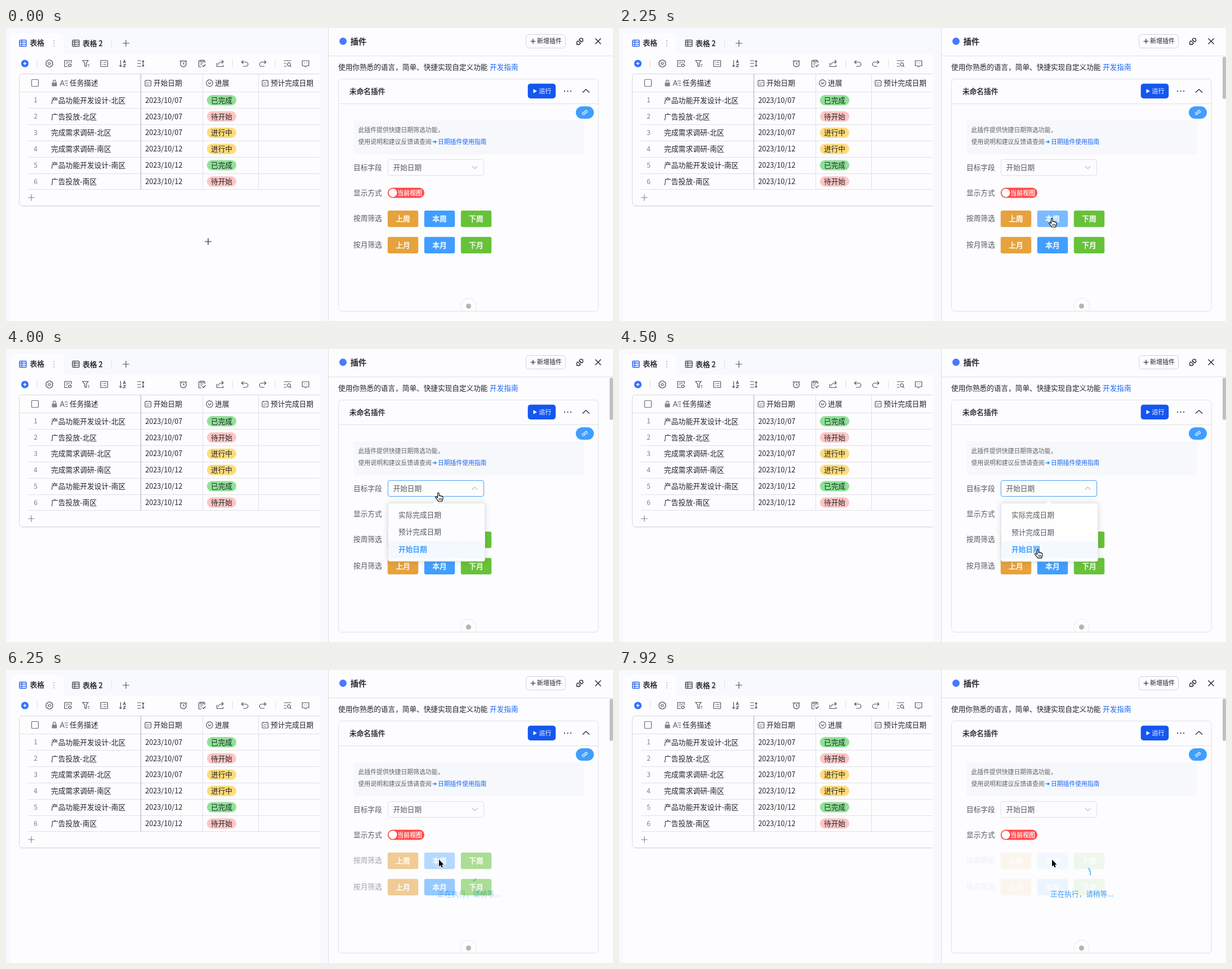
Write an HTML page that moves like this. It is 1078 px wide and 520 px high and loops after 8 s.

```html
<!DOCTYPE html>
<html lang="zh-CN">
<head>
<meta charset="utf-8">
<title>日期筛选</title>
<style>
html, body { margin: 0; width: 100%; height: 100%; overflow: hidden; background: #f8f9fe; }
svg { display: block; }
text { font-family: "Noto Sans CJK SC", "Noto Sans CJK", sans-serif; white-space: pre; }
</style>
</head>
<body>
<svg id="stage" width="1078" height="520" viewBox="0 0 1078 520"></svg>
<script>
const LOOP = 8000;
const STEP = 1000 / 12;
const INK = '#1f2329', GREY = '#51565d', FORM = '#55585e', LINE = '#dee0e3', PANEL = '#fdfdff';
const BLUE = '#409eff', LINK = '#1a66f5';

const rect = (x, y, w, h, fill, r = 0, extra = '') =>
  `<rect x="${x}" y="${y}" width="${w}" height="${h}" rx="${r}" fill="${fill}" ${extra}/>`;
const box = (x, y, w, h, stroke, r = 0, fill = 'none', extra = '') =>
  rect(x, y, w, h, fill, r, `stroke="${stroke}" ${extra}`);
const path = (d, stroke = GREY, w = 1.2, extra = '') =>
  `<path d="${d}" fill="none" stroke="${stroke}" stroke-width="${w}" ${extra}/>`;
const disc = (x, y, r, fill, extra = '') =>
  `<circle cx="${x}" cy="${y}" r="${r}" fill="${fill}" ${extra}/>`;
// Text placed by its vertical centre
const label = (x, cy, s, size = 12.65, fill = INK, extra = '') =>
  `<text x="${x}" y="${cy + size * 0.355}" font-size="${size}" fill="${fill}" ${extra}>${s}</text>`;
const at = (x, y, s) => `<g transform="translate(${x} ${y})">${s}</g>`;
// A thin outline gives a weight between regular and bold
const medium = (color, w = 0.35) => `stroke="${color}" stroke-width="${w}"`;
const plus = (x, y, r, stroke, w) => path(`M${x - r} ${y}h${2 * r}M${x} ${y - r}v${2 * r}`, stroke, w);

const sheetIcon = c => box(-6, -5.5, 12, 11, c, 1, 'none', 'stroke-width="1.4"') +
  path('M-6-2H6M-6 1.8H6M-2-5.5V5.5', c, 1.3);
const dateIcon = box(-5, -5, 10.5, 10, GREY, 1, 'none', 'stroke-width="1.2"') +
  path('M-2.5-6v2M3-6v2', GREY, 1.2) + path('M-2.6-.8h1.4M-.3-.8h1.4M2-.8h1.4M-2.6 2.2h1.4M-.3 2.2h1.4', GREY, 1.3);
const linkIcon = c => path('M-1 1.6a2.3 2.3 0 0 1 0-3l1.8-1.8a2.2 2.2 0 0 1 3.1 3.1l-1 1M1-1.6a2.3 2.3 0 0 1 0 3l-1.8 1.8a2.2 2.2 0 0 1-3.1-3.1l1-1', c, 1.1);
const plugIcon = `<g transform="rotate(45)">${path('M-3.3-2V-3.2a3.3 3.3 0 0 1 6.6 0V-2ZM0-6.5V-8.2M-3.3 1.6V3a3.3 3.3 0 0 0 6.6 0V1.6ZM0 6.3V8.2M-1.3-2V.2M1.3-2V.2', INK, 1.2)}</g>`;

function gearIcon() {
  let d = '';
  for (let i = 0; i < 6; i++) {
    const a = i * Math.PI / 3, p = (r, o) => `${(r * Math.sin(a + o)).toFixed(2)} ${(-r * Math.cos(a + o)).toFixed(2)}`;
    d += `${i ? 'L' : 'M'}${p(6.5, -0.28)}L${p(6.5, 0.28)}L${p(5.1, 0.52)}`;
  }
  return path(d + 'Z', GREY, 1.2, 'stroke-linejoin="round"') + disc(0, 0, 2, 'none', `stroke="${GREY}" stroke-width="1.2"`);
}

function toolbar() {
  const sheet = 'M6-1V-5.5H-6V5.5H0';
  const icons = [
    [77, gearIcon()],
    [110, path(sheet + 'M-3.5-2.5h7M-3.5.5h3') + disc(3.5, 3.2, 2.4, 'none', `stroke="${GREY}" stroke-width="1.3"`)],
    [142, path('M-6-5.5H4L.5-1V5.5L-2.5 4V-1ZM2.5 2H6.5M3.5 5H6')],
    [174, box(-6, -5.5, 12.5, 11, GREY, 1, 'none', 'stroke-width="1.2"') + path('M-3.5-2h1.4M-.8-2h5M-3.5 2h1.4M-.8 2h5')],
    [207, path('M-3.5-6V5.5M-5.8 3.2L-3.5 5.7L-1.2 3.2M1.2-.8L3.3-6L5.4-.8M1.9-2.4H4.7M1.3 1.5H5.2L1.3 5.7H5.5')],
    [239, path('M-6-5H1M-6 0H1M-6 5H1M4.5-4.5V4.5M2.7-3L4.5-5L6.3-3M2.7 3L4.5 5L6.3 3')],
    [315, disc(0, 0.5, 5.3, 'none', `stroke="${GREY}" stroke-width="1.2"`) + path('M0-2.5V1H2.6M-6.4-3.4L-3.7-5.9M6.4-3.4L3.7-5.9')],
    [348, path('M3-5H5V-1M-3-5H-5.5V6H-.5M-3-6H3V-3.8H-3ZM-3-1H2.5M-3 2H0M1 3.5L3 5.5L6.5 1.5')],
    [380, path('M-5.5-1V5.5H5.5V2.5M-3 2C-2.5-1.5 0-3 5.5-3M3-6L6-3L3 0')],
    [424, path('M-2.5-5.5L-5.7-2.5L-2.5.5M-5.5-2.5H2A3.7 3.7 0 0 1 2 5H-3')],
    [456, path('M2.5-5.5L5.7-2.5L2.5.5M5.5-2.5H-2A3.7 3.7 0 0 0-2 5H3')],
    [500, path('M-6.5-5H6.5M-6.5 0H-2.5M-6.5 5H-1.5M4.2 3.7L6.5 6') + disc(2.4, 1.6, 2.9, 'none', `stroke="${GREY}" stroke-width="1.2"`)],
    [532, path('M-5.8-5H5.8V4H2L0 6L-2 4H-5.8ZM-2.8-1h1.4M1.4-1h1.4')]
  ];
  return disc(33.5, 63, 6.6, '#3370ff') + plus(33.5, 63, 3, '#fff', 1.4) +
    icons.map(([x, s]) => at(x, 63, s)).join('') +
    path('M55.5 56v14M402.5 56v14M478.5 56v14', LINE, 1);
}

function table() {
  const states = { 已完成: '#8fe296', 待开始: '#fdc6c4', 进行中: '#ffdb7a' };
  const rows = [
    ['产品功能开发设计-北区', '07', '已完成'], ['广告投放-北区', '07', '待开始'],
    ['完成需求调研-北区', '07', '进行中'], ['完成需求调研-南区', '12', '进行中'],
    ['产品功能开发设计-南区', '12', '已完成'], ['广告投放-南区', '12', '待开始']
  ];
  let s = `<path d="M557 315.5H29a5.5 5.5 0 0 1-5.5-5.5V87a5.5 5.5 0 0 1 5.5-5.5H557" fill="${PANEL}" stroke="#d4d7dc"/>` +
    path('M27 316.8H557', '#ecedf2', 1) +
    path('M24 113.5H557M349.5 82V286.5M448.5 82V286.5', LINE, 1);
  rows.forEach(([task, day, state], i) => {
    const y = 128.2 + i * 28.85, edge = Math.round(y + 14) + 0.5;
    s += path(`M39 ${edge}H557`, LINE, 1) +
      label(52.5, y, i + 1, 12, '#7c8188', 'text-anchor="middle"') +
      label(80, y, task, 12.8) + label(247.3, y, `2023/10/${day}`) +
      rect(356.8, y - 9.2, 52.2, 18.2, states[state], 9) + label(364, y, state);
  });
  return s + path('M239.5 82V286.5', '#b4b8be', 1.2) + plus(45, 301, 5.7, '#7c8188', 1.1) +
    box(45.5, 91.5, 12, 12, '#6b7078', 1, 'none', 'stroke-width="1.2"') +
    rect(81.5, 97, 9, 6.5, '#80858c', 1) + path('M83.5 97V95a2.5 2.5 0 0 1 5 0V97', '#80858c', 1.3) +
    path('M96 102.5L99.8 93L103.6 102.5M97.4 99.3H102.2M104 94H110M105 98H110M106 102H110', GREY, 1.1) +
    label(113, 97.7, '任务描述') + at(252, 98, dateIcon) + label(262, 97.7, '开始日期') +
    disc(361.5, 97.7, 5.8, 'none', `stroke="${GREY}" stroke-width="1.2"`) + path('M358.7 96.5L361.5 99.3L364.3 96.5') +
    label(371, 97.7, '进展') + at(460, 98, dateIcon) + label(470, 97.7, '预计完成日期');
}

function leftSide() {
  return rect(0, 0, 572, 520, '#f8f9fe') + rect(8, 46, 550, 474, PANEL) +
    `<path d="M8 46V15a6 6 0 0 1 6-6H96a6 6 0 0 1 6 6V46Z" fill="${PANEL}"/>` +
    at(30, 27, sheetIcon('#2b62f0')) + label(42.5, 27, '表格', 12.65, INK, medium(INK)) +
    [22.7, 27.2, 31.7].map(y => disc(85, y, 0.85, '#8f959e')).join('') +
    at(124, 27, sheetIcon(GREY)) + label(136, 27, '表格 2', 12.8, INK, medium(INK)) +
    path('M187.5 19.5v15', LINE, 1) + plus(213, 27, 6, GREY, 1.2) + toolbar() + table();
}

function panelFrame() {
  return rect(572, 0, 506, 520, PANEL) + path('M572.5 0V520', '#d9dce2', 1) + path('M573 49.5H1078', LINE, 1) +
    disc(598.5, 23.5, 6.5, '#4a78ff') + label(611.7, 23.5, '插件', 14.2, INK, medium(INK, 0.5)) +
    box(923.5, 11.5, 70, 24, '#d0d3d6', 5) + plus(936, 23.5, 4.3, INK, 1.2) + label(943, 23.5, '新增插件', 11) +
    at(1019, 24, plugIcon) +
    path('M1046.5 18.5l10 10M1056.5 18.5l-10 10', INK, 1.4) +
    label(590, 69.4, '使用你熟悉的语言，简单、快捷实现自定义功能') + label(859, 69.4, '开发指南', 12.65, LINK) +
    box(590.5, 90.5, 461.5, 412, LINE, 6, PANEL) + path('M591 134.5H1052', LINE, 1) +
    label(610, 112, '未命名插件', 12.7, INK, medium(INK)) +
    rect(926.7, 98.8, 49.5, 26.2, '#1456f0', 5) + '<path d="M936.5 108.2L943 112L936.5 115.8Z" fill="#fff"/>' +
    label(946.5, 112, '运行', 11, '#fff') +
    [992, 997.5, 1003].map(x => disc(x, 112, 1.1, INK)).join('') +
    path('M1024 114.5L1030 108.8L1036 114.5', INK, 1.3) +
    rect(1012, 139, 32, 22, BLUE, 11) + at(1028, 150, linkIcon('#fff')) +
    rect(617, 164, 409, 60, '#f7f8fb', 4) +
    label(625.5, 181.5, '此插件提供快捷日期筛选功能，', 10.85, '#606266') +
    label(625.5, 202, '使用说明和建议反馈请查阅', 10.85, '#606266') +
    path('M757.5 202H764M761.5 199.6L764 202L761.5 204.4', '#1e90ff', 1.4) +
    label(767, 202, '日期插件使用指南', 10.8, LINK) +
    path('M810.5 502A14 14 0 1 1 832.5 502', '#e6e7eb', 1) + disc(821.5, 493.5, 4.5, '#b4b5b0');
}

const columns = [
  { x: 677.8, name: '上', base: '#e6a23c', lit: '#eebe77' },
  { x: 742.8, name: '本', base: BLUE, lit: '#79bbff' },
  { x: 807.8, name: '下', base: '#67c23a', lit: '#95d475' }
];
const buttonW = 54.4, buttonH = 29.2;
const buttons = [['周', 324], ['月', 370.8]].flatMap(([unit, y]) =>
  columns.map(c => ({ ...c, y, text: c.name + unit })));
const main = buttons[1];

function form() {
  return label(617, 247.2, '目标字段', 12.65, FORM) + label(617, 292.5, '显示方式', 12.65, FORM) +
    label(617, 338, '按周筛选', 12.65, FORM) + label(617, 384.3, '按月筛选', 12.65, FORM) +
    box(678.3, 233.4, 170.3, 28.2, '#dcdfe6', 3.5, PANEL, 'id="select"') +
    label(687.5, 247.2, '开始日期', 12.65, FORM) +
    path('M-4.8-2.3L0 2.3L4.8-2.3', '#b4b8bf', 1.1, 'id="chevron"') +
    rect(677.8, 283.6, 65.2, 18, '#ff4949', 9) + disc(687, 292.6, 7.4, '#fff') +
    label(695, 292.6, '当前视图', 11, '#fff', medium('#fff', 0.25)) +
    buttons.map((b, i) => rect(b.x, b.y, buttonW, buttonH, b.base, 3, `id="button${i}"`) +
      label(b.x + buttonW / 2, b.y + buttonH / 2, b.text, 12.65, '#fff', `${medium('#fff', 0.5)} text-anchor="middle"`)).join('');
}

const optionTop = 279, optionHeight = 30.8;
function dropdown() {
  const items = ['实际完成日期', '预计完成日期', '开始日期'];
  return '<g id="menu">' +
    box(678.5, 273.5, 172, 103.5, '#e4e7ed', 3.5, '#fefeff', 'style="filter:drop-shadow(0 0 5px rgba(0,0,0,.14))"') +
    `<path d="M758 274L763.5 268.5L769 274" fill="#fefeff" stroke="#e4e7ed"/>` +
    rect(679, optionTop, 171, optionHeight, '#f4f9ff', 0, 'id="hover"') +
    items.map((s, i) => label(697, 294.3 + i * optionHeight, s, 12.65,
      i === 2 ? BLUE : FORM, i === 2 ? 'font-weight="700"' : '')).join('') + '</g>';
}

function loading() {
  return `<g id="loading">${rect(617, 317, 409, 91, PANEL, 0, 'opacity=".91"')}` +
    `<g id="spinner"><circle id="arc" r="20" fill="none" stroke="${BLUE}" stroke-width="2" stroke-linecap="round"/></g>` +
    label(766, 397.3, '正在执行，请稍等...', 12.65, BLUE) + '</g>';
}

function cursors() {
  return '<g id="cursor">' +
    `<g id="cross">${plus(0, 1, 6.2, '#fff', 2.4)}${plus(0, 1, 6, '#222', 1.2)}</g>` +
    '<path id="arrow" transform="scale(.93)" d="M0 0V13L3 10.3L5 14.9L7.2 14L5.2 9.5H9.2Z" fill="#000" stroke="#fff" stroke-width="1.6" paint-order="stroke"/>' +
    '<g id="hand" stroke="#000" stroke-width="1.1" stroke-linejoin="round"><path fill="#fff" d="M-1.5 2.7C-1.5.9 1.1.9 1.1 2.7V7.3C1.4 6 3.6 6.2 3.7 7.6C4.3 6.6 6 6.9 6 8.3C6.8 7.7 8 8.2 8 9.5V11.8C8 13.3 6.8 14.2 6.6 16.6H-.6C-1 14.8-4 12.3-5.4 9.9C-5.9 8.7-4.3 7.8-3.2 8.9L-1.5 10.5Z"/>' +
    '<path stroke-width=".9" d="M1.1 11v3.6M3.2 11v3.6M5.3 11v3.6"/></g></g>';
}

document.getElementById('stage').innerHTML = leftSide() + panelFrame() + form() + dropdown() + loading() +
  rect(1072, 51, 6, 75, '#bfc0c3', 3, 'id="scroll"') + cursors();

const el = id => document.getElementById(id);
const set = (id, attrs) => { for (const k in attrs) el(id).setAttribute(k, attrs[k]); };
const show = (id, on) => set(id, { visibility: on ? 'visible' : 'hidden' });
const clamp = v => Math.min(1, Math.max(0, v));
const ramp = (t, a, b) => clamp((t - a) / (b - a));
const smooth = p => p * p * (3 - 2 * p);

// Pointer stops: time, x, y
const stops = [
  [0, 359, 378], [1416, 359, 378], [2083, 766, 378], [2250, 769, 336.6],
  [3250, 769, 336.6], [3583, 768, 242.6], [3670, 768, 242.6], [4000, 768, 253.6],
  [4083, 768, 253.6], [4500, 744, 354.3], [5160, 744, 354.3], [5500, 769, 336.6], [LOOP, 769, 336.6]
];

function pointer(t) {
  const i = Math.max(1, stops.findIndex(s => s[0] >= t));
  const [t0, x0, y0] = stops[i - 1], [t1, x1, y1] = stops[i];
  const p = smooth(ramp(t, t0, t1));
  return [x0 + (x1 - x0) * p, y0 + (y1 - y0) * p];
}

const inside = (x, y, left, top, w, h) => x >= left && x <= left + w && y >= top && y <= top + h;

function spin(t) {
  const s = Math.max(0, 0.13 + (t - 6250) * 0.000937);
  const phase = (s % 1.5) / 0.75;
  const p = smooth(phase % 1);
  const [dash, gap, offset] = phase < 1 ? [1 + 89 * p, 200 - 50 * p, -40 * p] : [90, 150, -40 - 80 * p];
  set('spinner', { transform: `translate(821.5 361.5) rotate(${s * 180}) scale(.785)` });
  set('arc', { 'stroke-dasharray': `${dash} ${gap}`, 'stroke-dashoffset': offset });
}

function render(time) {
  const t = Math.floor((time + 4) / STEP) * STEP;
  const [x, y] = pointer(t);
  const open = smooth(ramp(t, 3640, 4010)) * (1 - smooth(ramp(t, 4940, 5290)));
  const busy = ramp(t, 6080, 6420);
  const menuOpen = t > 3660 && t < 4990;
  const overSelect = inside(x, y, 678, 233, 171, 29);
  const overMenu = open > 0.5 && inside(x, y, 678, 273, 172, 104);
  let overButton = false;

  buttons.forEach((b, i) => {
    const over = !overMenu && inside(x, y, b.x, b.y, buttonW, buttonH);
    overButton = overButton || over;
    const pressed = b === main && t > 5990 && t < 6070;
    set('button' + i, { fill: pressed ? '#337ecc' : over ? b.lit : b.base });
  });

  const focused = t > 3660 && t < 5990;
  set('select', { stroke: focused ? BLUE : overSelect ? '#c0c4cc' : '#dcdfe6' });
  set('chevron', { transform: `translate(832.5 247.4) rotate(${180 * open})` });

  const row = Math.floor((y - optionTop) / optionHeight);
  const active = menuOpen && row >= 0 && row < 3 ? row : 2;
  set('menu', { opacity: open, transform: `translate(0 ${268 * (1 - open)}) scale(1 ${open})` });
  set('hover', { y: optionTop + active * optionHeight });
  show('menu', open > 0);

  set('loading', { opacity: busy });
  spin(t);
  show('scroll', t > 2000 || x > 573);

  const hand = t < 6070 && (overSelect || overMenu || overButton);
  const cross = t < 575;
  set('cursor', { transform: `translate(${x} ${y})` });
  show('cross', cross);
  show('hand', hand);
  show('arrow', !cross && !hand);
}

const start = performance.now();
function tick() {
  render((performance.now() - start) % LOOP);
  requestAnimationFrame(tick);
}
tick();
</script>
</body>
</html>
```
